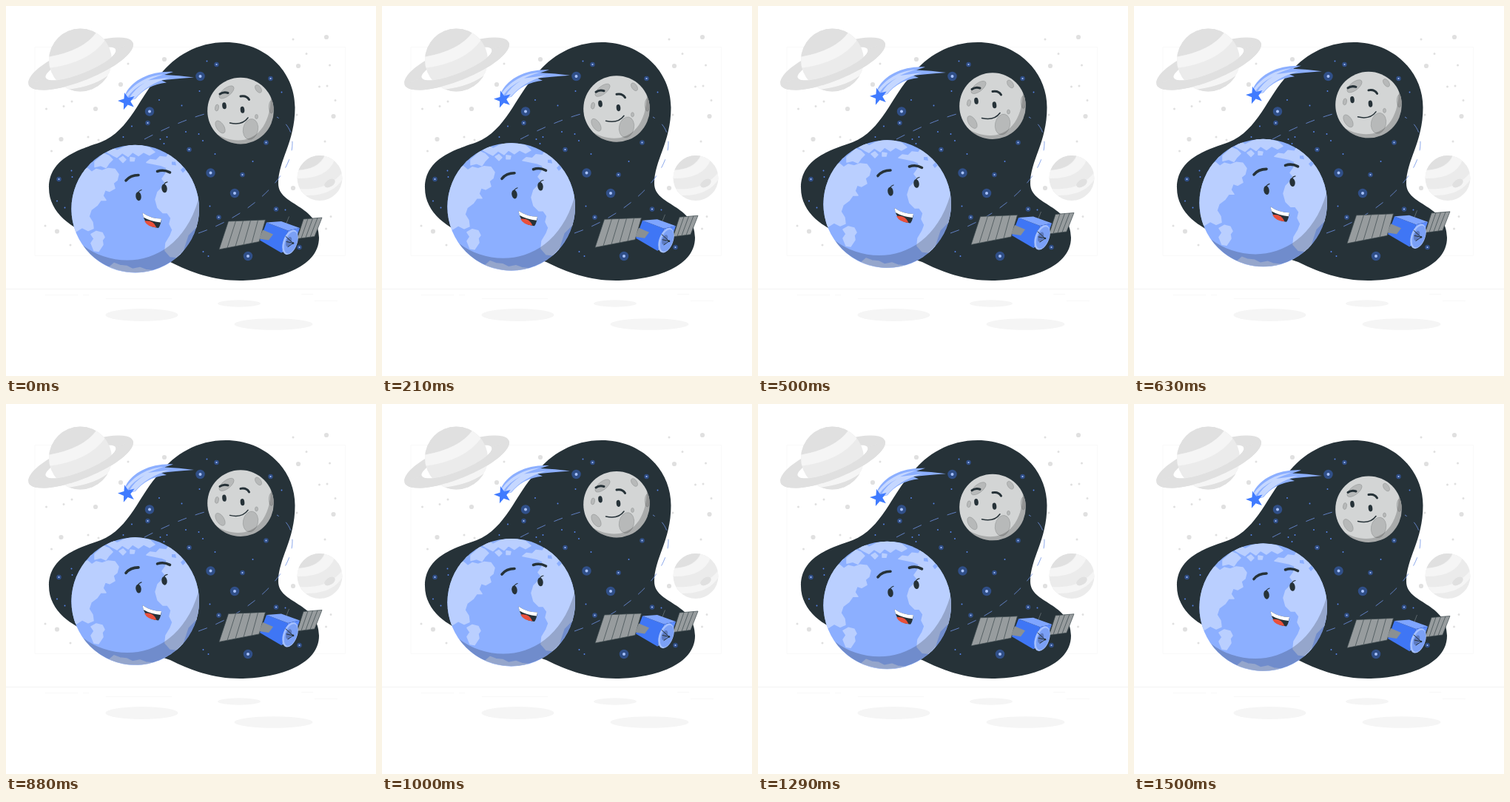
An HTML page for the animation above (1.54 s loop, 500 by 500 pixels).

```html
<!DOCTYPE html>
<html lang="en">
<head>
<meta charset="utf-8">
<title>Floating planets</title>
<style>
  html, body { margin: 0; height: 100%; overflow: hidden; background: #fff; }
  svg { display: block; width: 100%; height: 100%; }
  .dots { fill: none; stroke-linecap: round; }
  .ink { fill: #263238; }
  .line { fill: none; stroke: #263238; stroke-linecap: round; }
</style>
</head>
<body>
<svg viewBox="0 0 500 500">
  <defs>
    <clipPath id="ringedClip"><circle cx="100.500" cy="73" r="42.500"/></clipPath>
    <clipPath id="smallClip"><circle cx="424" cy="232.500" r="30.500"/></clipPath>
    <clipPath id="earthClip"><circle cx="174.700" cy="274.700" r="86.300"/></clipPath>
    <clipPath id="moonClip"><circle cx="317" cy="142.200" r="44.800"/></clipPath>
    <clipPath id="frontClip"><path d="M-90 0H90V60H-90z"/></clipPath>
    <path id="ring" fill="#e0e0e0" fill-rule="evenodd"
      d="M-76 0A76 23 0 0 1 76 0A76 23 0 0 1-76 0M-51 0A51 13 0 0 0 51 0A51 13 0 0 0-51 0"/>
    <path id="bigStars" d="M262.500 95h0M194 142.500h0M276.500 225.500h0M309 253h0M327 338h0"/>
    <path id="midStars" d="M284.500 79h0M357.500 98h0M191.500 158h0M351.500 184.500h0M319.500 228h0M247.500 194h0M287.500 285.500h0M365 274.500h0M71.500 234h0M396.500 326h0"/>
  </defs>

  <!-- backdrop -->
  <path d="M39 55.500H458.500V337.500H39z" fill="none" stroke="#f9f9f9"/>
  <path d="M0 382.500H500" stroke="#f3f3f3"/>
  <path d="M53 390.500h44m7 0h8M135 395.500h89M399 389.500h16m2 9h31" stroke="#f8f8f8"/>
  <g fill="#f5f5f5">
    <ellipse cx="183.500" cy="417.500" rx="49" ry="8.500"/>
    <ellipse cx="315" cy="402" rx="29" ry="4.700"/>
    <ellipse cx="361.500" cy="430" rx="53" ry="7.800"/>
  </g>
  <g class="dots" stroke="#e0e0e0">
    <path stroke-width="6.200" d="M433 42h0M395 81h0M442.500 149h0M388 246h0M214 72h0M155 106h0M121 139h0M74.500 180h0M69 304.500h0"/>
    <path stroke-width="3" d="M388 45h0M406 64.500h0M437.500 80h0M423.500 109h0M434 108h0M445 127.500h0M393 147h0M431 183h0M439 284.500h0M432.500 301h0M165 78h0M89 129h0M78 135.500h0M54.500 139h0M111 177h0M125 181h0M61.500 196h0M53 297h0M87 323h0"/>
  </g>

  <!-- ringed planet -->
  <use href="#ring" transform="translate(101 78) rotate(-22)"/>
  <g clip-path="url(#ringedClip)">
    <path fill="#ebebeb" d="M50 20h100v100H50z"/>
    <path fill="#e0e0e0" d="M50 20H118L122 36Q104 61 56 69z"/>
    <path fill="#f5f5f5" d="M56 69Q104 61 122 36L134 46Q112 77 57 84z"/>
    <path fill="#f5f5f5" d="M66 104Q118 104 146 74L140 92Q122 108 84 113z"/>
    <path fill="#e0e0e0" d="M84 113Q122 108 140 92L125 120H84z"/>
  </g>
  <use href="#ring" transform="translate(101 78) rotate(-22)" clip-path="url(#frontClip)"/>

  <!-- small planet -->
  <g clip-path="url(#smallClip)">
    <path fill="#ebebeb" d="M390 200h70v70h-70z"/>
    <path fill="#e0e0e0" d="M390 198H432Q424 222 390 222z"/>
    <path fill="#f5f5f5" d="M390 222Q424 222 432 200L444 208Q434 234 392 233z"/>
    <path fill="#f5f5f5" d="M397 247Q436 250 455 224V234Q440 257 404 256z"/>
    <ellipse cx="437.500" cy="239.500" rx="8" ry="4.800" transform="rotate(-32 437.500 239.500)" fill="#e0e0e0"/>
  </g>

  <!-- night sky -->
  <path class="ink" d="M297 49C350 49 390.500 88 390.500 137C390.500 185 368 208 368 240C368 270 423 268 423 313C423 355 362 371 316 371C280 371 250 360 222 346L120 312C90 301 58 280 58 246C58 205 100 194 128 184C168 168 180 122 208 93C228 68 258 49 297 49z"/>
  <path d="M187 180Q264 140 310 139M260 307C330 283 387 230 387 185C387 165 375 155 366 150" fill="none" stroke="#7093e6" stroke-width=".8" stroke-dasharray="12.500"/>
  <g class="dots" stroke="#407bff">
    <g stroke-opacity=".4">
      <use href="#bigStars" stroke-width="12.500"/>
      <use href="#midStars" stroke-width="6.500"/>
    </g>
    <path stroke-width="1.900" stroke="#5684ec" d="M271.500 74.500h0M372.500 116.500h0M207 127h0M237.500 134.500h0M261.500 115h0M170 162.500h0M243 170h0M260.500 173h0M266 182h0M282.500 200h0M333.500 210h0M217.500 177h0M208.500 180h0M213.500 186h0M158.500 177h0M88.500 222.500h0M89.500 231h0M69 263.500h0M79.500 272.500h0M275.500 270.500h0M266.500 332h0M273.500 338h0M377.500 275.500h0"/>
    <g stroke="#a9c3ff">
      <use href="#bigStars" stroke-width="4"/>
      <use href="#midStars" stroke-width="2.100"/>
    </g>
  </g>

  <g id="floating">
    <!-- comet -->
    <path fill="#8cafff" d="M162 118C172 100 196 88 226 89.500L214 93.500Q234 94 254 97Q226 99 210 101L217 104Q190 107 175 126L163 129z"/>
    <path fill="#c5d7ff" d="M162 121C172 106 192 94 213 93Q200 97 192 101L222 97Q190 106 174 126L166 126Q174 112 188 104Q172 112 164 124z"/>
    <path id="star" fill="#407bff"/>

    <!-- earth -->
    <g clip-path="url(#earthClip)">
      <path fill="#8cafff" d="M88 188h174v174H88z"/>
      <g fill="#bacfff" stroke="#bacfff" stroke-width="1.500" stroke-linejoin="round">
        <path d="M110 220l6 5 6-4 8 2 8-3 9 1 5 7-2 8-5 4 2 7-7 4-6-2-3 8 4 6-7 0-5 7-8 6-3 9 5 8 1 8-7 3-8-4-8 5-12-8V232z"/>
        <path d="M115 309l7-4 8 2 3 6-3 4 1 6-6 9-6-1-4-10 4-6z"/>
        <path d="M120 211l7-6 5-5 7 3 5 5-5 5-4 6-7-3-8 2z"/>
        <path d="M137 198l8-5 5 3 10-5 10-3 13 1 11 3 7 6-7 4-8-4-7 5-8-5-6 6-8-5-7 6-6-3z"/>
        <path d="M153 207l5-3 4 4-4 4zM168 205l6 1-1 4-5 0zM107 212l5-4 3 4-5 4z"/>
        <path d="M190 212l5-4 8 1 5-5 9 1 4-7 60 20V288l-16 6-10 7-9 9-4 12-4 13-7 5-9-1-7-8 1-10 6-10 3-8-4-8 2-8-5-7-6 0-7-7-3-11 3-10 6-6 4-7-4-5 5-7 1-8-7-3z"/>
        <path d="M138 355l8-7 8 3 9 1 8 4 10-2 8 3 9 1-8 10h-50z"/>
      </g>
      <path fill="#8cafff" d="M224 211l5 0 1 5-6-1zM236 222l4-4 3 4-4 4z"/>
    </g>
    <path fill-opacity=".2" d="M104 324C150 359 233 354 260 262A86.300 86.300 0 0 1 104 324z"/>
    <path class="line" stroke-width="3.600" d="M162 236.500Q168 229 179 229M204.500 224Q213 221 221.500 225.500"/>
    <g class="ink">
      <ellipse cx="179" cy="257.700" rx="3.700" ry="6" transform="rotate(-8 179 257.700)"/>
      <ellipse cx="214" cy="247" rx="3.700" ry="5.800" transform="rotate(-8 214 247)"/>
      <path d="M184.500 280Q196 288 210 288Q209 297 206 300.500Q187 299 184.500 280z"/>
    </g>
    <path class="line" stroke-width="1.200" d="M178.500 252.500Q180 250 183 249M213.500 241.500Q215 239 218 238.500"/>
    <path fill="#fff" d="M184.500 280Q196 288 210 288L208.800 293Q195 291.500 185.800 286z"/>
    <path fill="#e9503b" d="M187 291Q199 289 203.500 300Q191 299 187 291z"/>

    <!-- moon -->
    <g clip-path="url(#moonClip)">
      <path fill="#d3d5d5" d="M270 95h94v94h-94z"/>
      <g fill="#b7b9b9" stroke="#969999" stroke-width=".6">
        <ellipse cx="298" cy="117" rx="12" ry="5.500" transform="rotate(-38 298 117)"/>
        <ellipse cx="341" cy="112.500" rx="3.500" ry="6" transform="rotate(-35 341 112.500)"/>
        <ellipse cx="285" cy="138" rx="2.500" ry="4.500" transform="rotate(10 285 138)"/>
        <ellipse cx="338.500" cy="150" rx="2" ry="3"/>
        <ellipse cx="289.500" cy="164" rx="5" ry="9.500" transform="rotate(-33 289.500 164)"/>
        <ellipse cx="330.500" cy="167" rx="10" ry="14" transform="rotate(12 330.500 167)"/>
        <ellipse cx="358.500" cy="137" rx="3.200" ry="8.500"/>
      </g>
      <path fill-opacity=".2" d="M282 172C315 193 357 183 358 122L370 120V190H282z"/>
    </g>
    <path class="line" stroke-width="3" d="M289 119.500Q294 116 300 118M317 122.500Q325 121 328.500 127"/>
    <g class="ink">
      <ellipse cx="295" cy="135.300" rx="2.800" ry="4.600" transform="rotate(-6 295 135.300)"/>
      <ellipse cx="319.500" cy="140.800" rx="2.800" ry="4.600" transform="rotate(-6 319.500 140.800)"/>
    </g>
    <path class="line" stroke-width="1.500" d="M302.500 158.500Q319 162.500 327 151.500"/>

    <!-- satellite -->
    <g fill="#979c9e" stroke="#3c484d" stroke-width=".7" stroke-linejoin="round">
      <path d="M300.500 291.500L350.500 289.500 342 319 288 329.500zM310.500 291.100L299 327.400M320.500 290.700L310 325.300M330.500 290.300L321 323.200M340.500 289.900L332 321.100"/>
      <path d="M402 288.500L427 286.500 417 312 393.500 315zM408 288L399 314.300M414.500 287.500L405 313.500M421 287L411 312.800"/>
    </g>
    <path stroke="#5b666b" d="M382.500 285L377 299"/>
    <path fill="#3f76f5" d="M352 293L381 304 372 334 343 317z"/>
    <path fill="#7fa5ff" d="M352 293L372 291.500 397 300.500 381 304z"/>
    <path fill="#5d8cff" d="M381 304L397 300.500 388 327 372 334z"/>
    <path fill="#8a9093" d="M347 303L361 309 355 317 342 315z"/>
    <g transform="rotate(20 384.500 320)">
      <ellipse cx="384" cy="320" rx="9.500" ry="17.500" fill="#a6c1ff"/>
      <ellipse cx="385" cy="320" rx="8" ry="15.500" fill="#7ba0f5"/>
      <ellipse cx="382" cy="320" rx="3.500" ry="7" fill="#5d7ac0"/>
    </g>
    <path class="line" d="M378 312L388 321 379 319M381 326L388 321"/>
    <circle class="ink" cx="388" cy="321" r="1.300"/>
  </g>
</svg>
<script>
  const LOOP = 1540, STEPS = 37, LIFT = 10;
  const floating = document.getElementById('floating');

  const starPoints = Array.from({ length: 10 }, (_, i) => {
    const angle = (-105 + i * 36) * Math.PI / 180;
    const radius = i % 2 ? 5 : 12.3;
    return [163.3 + radius * Math.cos(angle), 129.3 + radius * Math.sin(angle)];
  });
  document.getElementById('star').setAttribute('d', `M${starPoints.join('L')}z`);

  // Linear rise and fall, stepped at 24 pictures per second
  function draw() {
    const step = Math.floor(performance.now() % LOOP / LOOP * STEPS) + 1;
    const rise = LIFT * (1 - Math.abs(1 - 2 * step / STEPS));
    floating.setAttribute('transform', `translate(0 ${-rise})`);
    requestAnimationFrame(draw);
  }
  draw();
</script>
</body>
</html>
```
